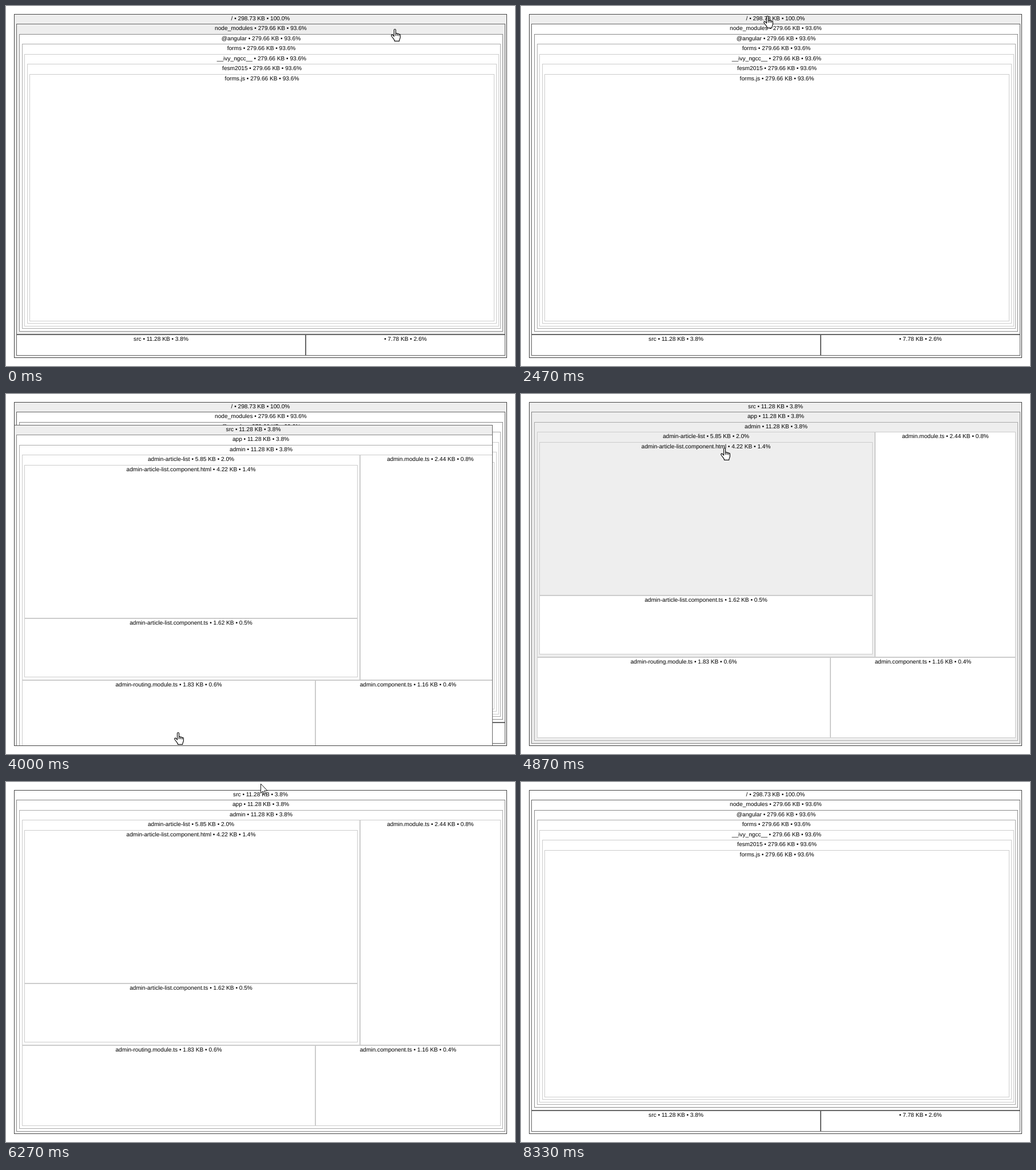
Animation, 890 px wide and 629 px high, one loop 8.87 s. Source, as an HTML page:

```html
<!DOCTYPE html>
<html lang="en">
<head>
<meta charset="utf-8">
<title>Bundle size treemap</title>
<style>
  html, body { margin: 0; width: 100%; height: 100%; overflow: hidden; background: #fff; }
  div {
    position: absolute; box-sizing: border-box; overflow: hidden;
    border: 1px solid; background: #fff;
  }
  p {
    margin: 0; padding-top: 1.5px; text-align: center; white-space: nowrap; color: #000;
    font: 10.14px/12px "Liberation Sans", Arial, sans-serif;
    text-rendering: geometricPrecision;
  }
  svg { position: absolute; left: 0; top: 0; z-index: 9; overflow: visible; }
  path { fill: #fff; stroke: #111; stroke-linejoin: round; stroke-linecap: round; }
</style>
</head>
<body>
<svg id="cursor" width="18" height="23">
  <path id="arrow" d="M.5 .5V16.5L4.2 13 7 18.6 9.2 17.6 6.6 12.2H11.6Z"/>
  <path id="hand" stroke-width="1.2" d="M5.5 13V2a1.5 1.5 0 0 1 3 0V8.2Q10.2 6.8 11.3 8.6 13 7.6 14 9.4 16.4 8.8 16.4 11.2V14.5C16.4 17 14.6 18 14.6 21.4H6.6C6.6 18.5 3 16 .9 12.3 0 10.4 2.2 9.4 3.6 11ZM8.5 8.2V11.4M11.3 8.6V11.6M14 9.4V12"/>
</svg>
<script>
const LOOP = 8870, ZOOM_IN = 3795, ZOOM_OUT = 6860, ZOOM_MS = 300, STEP = 200 / 3;
const ROOT = [13.8, 13.8, 876.4, 615.2];            // left, top, right, bottom
const INSET = [4.608, 17.51, -3.686, -4.608];
const SHADES = ['#444', '#666', '#888', '#aaa', '#ccc'];

// Sets a node's box relative to the padding corner of its parent.
function place(node, box, origin) {
  const [l, t, r, b] = box.map(Math.round);
  const [x, y] = origin ? origin.map(v => Math.round(v) + 1) : [0, 0];
  Object.assign(node.dom.style, {
    left: l - x + 'px', top: t - y + 'px', width: r - l + 'px', height: b - t + 'px'
  });
}

// `edges` overrides sides of the parent's inner area; `full` is the box children are laid out in.
function add(parent, caption, edges = [], full) {
  const box = parent ? parent.full.map((v, i) => edges[i] ?? v + INSET[i]) : ROOT;
  const node = {
    box, full: full || box, kids: [], depth: parent ? parent.depth + 1 : 0,
    dom: document.createElement('div')
  };
  node.dom.style.borderColor = SHADES[Math.min(node.depth, 4)];
  node.dom.innerHTML = `<p>${caption}</p>`;
  place(node, box, parent && parent.full);
  (parent ? parent.dom : document.body).append(node.dom);
  if (parent) parent.kids.push(node);
  nodes.push(node);
  return node;
}

const nodes = [];
const root = add(null, '/ • 298.73 KB • 100.0%');
let module = add(root, 'node_modules • 279.66 KB • 93.6%', [, , , 573.7]);
for (const name of ['@angular', 'forms', '__ivy_ngcc__', 'fesm2015', 'forms.js'])
  module = add(module, name + ' • 279.66 KB • 93.6%');
add(root, '• 7.78 KB • 2.6%', [524, 573.7]);

const src = add(root, 'src • 11.28 KB • 3.8%', [, 573.7, 524], ROOT);
src.dom.style.zIndex = 1;
const app = add(src, 'app • 11.28 KB • 3.8%');
const admin = add(app, 'admin • 11.28 KB • 3.8%');
const list = add(admin, 'admin-article-list • 5.85 KB • 2.0%', [, , 619, 460]);
add(list, 'admin-article-list.component.html • 4.22 KB • 1.4%', [, , , 352]);
add(list, 'admin-article-list.component.ts • 1.62 KB • 0.5%', [, 352]);
add(admin, 'admin.module.ts • 2.44 KB • 0.8%', [619, , , 460]);
add(admin, 'admin-routing.module.ts • 1.83 KB • 0.6%', [, 460, 541]);
add(admin, 'admin.component.ts • 1.16 KB • 0.4%', [541, 460]);

// Pointer path: time, x, y
const PATH = [
  [0, 679, 44], [130, 668, 45], [400, 565, 58], [730, 440, 67.5], [800, 431, 66.5],
  [930, 428, 58], [1000, 428, 48], [1130, 428, 30], [1270, 430, 21],
  [1620, 430, 21], [2000, 430, 10], [2270, 430, 10], [2460, 430, 21],
  [2950, 430, 21], [3130, 416, 70], [3270, 365, 320], [3400, 313, 530], [3463, 304, 562],
  [3533, 301, 571], [3800, 300, 595],
  [4210, 300, 595], [4400, 312, 500], [4600, 338, 270], [4800, 353, 125], [4867, 355, 98],
  [5130, 380, 33], [5600, 420, 62], [6070, 445, 31], [6267, 445, 3], [6333, 445, 14],
  [6480, 445, 14], [6667, 445, 18],
  [7350, 445, 18], [7600, 420, 90], [7930, 250, 380], [8130, 120, 575], [8267, 48, 628]
];

function pointer(t) {
  const i = PATH.findIndex(k => k[0] > t);
  if (i < 0) return PATH.at(-1).slice(1);
  const a = PATH[Math.max(i - 1, 0)], b = PATH[i];
  const f = Math.max(0, (t - a[0]) / (b[0] - a[0]));
  return [a[1] + (b[1] - a[1]) * f, a[2] + (b[2] - a[2]) * f];
}

const contains = ([l, t, r, b], [x, y]) =>
  x >= Math.round(l) && x < r && y >= Math.round(t) && y < b;

function hoverChain(t, zoomed) {
  if (zoomed && t < 4250) return [root, src];       // hover waits for the next move
  const at = pointer(t - STEP), chain = [];
  let node = contains(ROOT, at) ? root : null;
  while (node) {
    chain.push(node);
    node = zoomed && node === root ? src : node.kids.find(k => contains(k.box, at));
  }
  return chain;
}

function ease(x) {
  return 1 - (1 - Math.min(1, Math.max(0, x))) ** 2.3;
}

function draw(now) {
  const t = Math.floor((now % LOOP) / STEP + 0.1) * STEP;
  const zoomed = t >= ZOOM_IN && t < ZOOM_OUT;
  const zoom = ease((t - ZOOM_IN) / ZOOM_MS) - ease((t - ZOOM_OUT) / ZOOM_MS);
  place(src, src.box.map((v, i) => v + (ROOT[i] - v) * zoom), ROOT);
  app.dom.style.display = zoomed ? '' : 'none';

  const visible = t < 8330;
  const chain = visible ? hoverChain(t, zoomed) : [];
  for (const n of nodes) n.dom.style.background = chain.includes(n) ? '#eee' : '#fff';

  const isHand = chain.length > 0;
  const [x, y] = pointer(t).map(Math.round);
  hand.style.display = isHand ? '' : 'none';
  arrow.style.display = isHand ? 'none' : '';
  cursor.style.display = visible ? '' : 'none';
  cursor.style.transform = `translate(${x - (isHand ? 6 : 0)}px, ${y - (isHand ? 4 : 0)}px)`;
}

let start;
function tick(now) {
  start ??= now;
  draw(now - start);
  requestAnimationFrame(tick);
}
draw(0);
requestAnimationFrame(tick);
</script>
</body>
</html>
```
